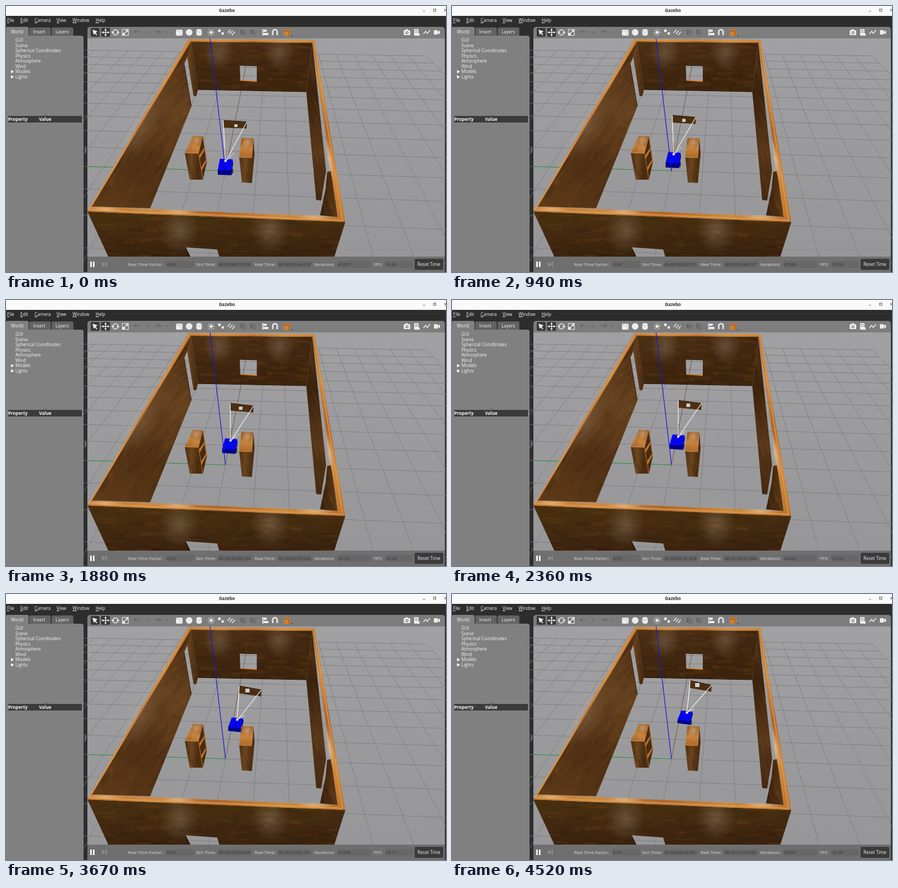
These frames come from a looping animation (800 px wide and 484 px high, 4.55 s). An HTML page with a canvas:

```html
<!DOCTYPE html>
<html lang="en">
<head>
<meta charset="utf-8">
<title>Gazebo</title>
<style>
html, body { margin: 0; width: 100%; height: 100%; overflow: hidden; background: #2d2d2d; }
#stage { position: relative; width: 800px; height: 484px; overflow: hidden; }
canvas { position: absolute; left: 0; top: 0; }
span {
  position: absolute; white-space: pre; line-height: 12px; color: #f4f4f4;
  font: 8.1px/12px "Open Sans", "Noto Sans", sans-serif;
}
span.bold { font-weight: 700; }
span.dark { color: #333; }
span.soft { color: #dedede; }
span.menu { display: block; }
span.menu::first-letter { text-decoration: underline; }
</style>
</head>
<body>
<div id="stage"><canvas id="view" width="800" height="484"></canvas></div>
<script>
const start = performance.now();
const LOOP = 4550, STEP = 30.335, LAST = 4520;
const stage = document.getElementById('stage');
const screen = document.getElementById('view').getContext('2d');
const layer = () => {
  const c = document.createElement('canvas');
  c.width = 800; c.height = 484;
  return c.getContext('2d');
};
let g = screen;

let seed = 7;
const rand = () => (seed = (seed * 16807) % 2147483647) / 2147483647;
const mix = (a, b, u) => a + (b - a) * u;
const between = (p, q, u) => [mix(p[0], q[0], u), mix(p[1], q[1], u)];

// ---------- drawing helpers: a shape is a list of [x, y] points ----------
function trace(points) {
  points.forEach(([x, y], i) => g[i ? 'lineTo' : 'moveTo'](x, y));
}
function poly(points, fill, hole) {
  g.beginPath();
  trace(points);
  g.closePath();
  if (hole) { trace(hole); g.closePath(); }
  g.fillStyle = fill;
  g.fill('evenodd');
}
function line(points, color, width = 1) {
  g.beginPath();
  trace(points);
  g.strokeStyle = color;
  g.lineWidth = width;
  g.stroke();
}
function arc(x, y, r, from, to, color, w = 1.5) {
  g.beginPath();
  g.arc(x, y, r, from, to);
  g.strokeStyle = color;
  g.lineWidth = w;
  g.stroke();
}
function box(x, y, w, h, fill, r = 0) {
  g.beginPath();
  g.roundRect(x, y, w, h, r);
  g.fillStyle = fill;
  g.fill();
}
function dot(x, y, r, fill) {
  g.beginPath();
  g.arc(x, y, r, 0, 7);
  g.fillStyle = fill;
  g.fill();
}
// Triangle of radius r pointing along angle a
function arrow(x, y, r, a, fill) {
  poly([0, 2.1, -2.1].map(d => [x + r * Math.cos(a + d), y + r * Math.sin(a + d)]), fill);
}
function ramp([x0, y0], [x1, y1], ...colors) {
  const s = g.createLinearGradient(x0, y0, x1, y1);
  colors.forEach((c, i) => s.addColorStop(i / (colors.length - 1), c));
  return s;
}
function glow(x, y, rx, ry, alpha, tilt = 0, tone = '205,185,165') {
  g.save();
  g.translate(x, y);
  g.rotate(tilt);
  g.scale(rx, ry);
  const s = g.createRadialGradient(0, 0, 0, 0, 0, 1);
  s.addColorStop(0, `rgba(${tone},${alpha})`);
  s.addColorStop(1, `rgba(${tone},0)`);
  g.fillStyle = s;
  g.fillRect(-1, -1, 2, 2);
  g.restore();
}
// Wooden face: base colour plus random plank stains along a slope
function wood(points, fill, slope, hole) {
  poly(points, fill, hole);
  g.save();
  g.clip('evenodd');
  const xs = points.map(p => p[0]), ys = points.map(p => p[1]);
  const x0 = Math.min(...xs), y0 = Math.min(...ys);
  const w = Math.max(...xs) - x0, h = Math.max(...ys) - y0;
  const run = 1 / Math.hypot(1, slope);
  for (let n = w * h / 160; n > 0; n--) {
    const x = x0 + rand() * w, y = y0 + rand() * h, l = (10 + rand() * 26) * run;
    const tone = rand() < .5 ? '20,8,0' : '165,105,50';
    line([[x, y], [x + l, y + l * slope]], `rgba(${tone},${.03 + rand() * .06})`, 2 + rand() * 5);
  }
  g.restore();
}

// ---------- room ----------
const ORIGIN = [399, 300], SKY = [371, 59];

// Floor position in metres to the screen, through two vanishing points
function ground(X, Y) {
  const a = .078 * X, b = .0039 * Y, w = 1 + a + b;
  return [(399 + a * 494 - b * 14000) / w, (300 - a * 190 - b * 161) / w];
}

// Corners in the order far left, far right, near right, near left
const OUTER = [[332, 60], [561, 62], [617, 393], [148, 374]];
const INNER = [[336, 65], [557, 67], [603, 384], [156, 365]];
const FAR_FOOT = [[349, 152], [546, 156]];

function paintGround() {
  box(148, 59, 650, 397, ramp([0, 59], [0, 456], '#a1a1a3', '#9b9b9d', '#979799'));
  for (let i = -10; i <= 10; i++) {
    line([ground(-10, i), ground(10, i)], '#7a7a7c', .8);
    line([ground(i, -10), ground(i, 10)], '#7a7a7c', .8);
  }
  line([[147, 292], ORIGIN], '#2f9a35');
  line([ORIGIN, [428, 152], [443, 75]], 'rgba(110,62,45,.55)');
}

function paintWalls() {
  const [nw, ne, se, sw] = INNER, [fl, fr] = FAR_FOOT;

  const pane = [[425, 108], [456, 109], [456, 137], [426, 135]];
  wood([nw, ne, fr, fl], ramp(nw, fl, '#4d3116', '#452a11', '#3d240d'), .02, pane);
  for (const x of [387, 497]) glow(x, 85, 28, 32, .24);
  line([pane[3], pane[2]], '#cf853c', 2);
  line([pane[0], pane[1]], '#2b1708');
  line([fl, fr], '#241408', 1.2);

  // left wall with its doorway
  wood([nw, fl, [346, 164], [341, 164], [328, 84]], ramp([330, 0], [350, 0], '#6a431d', '#40260e'), -1.2);
  wood([nw, [329, 94], [324, 106], [337, 183], [262, 368], sw],
    ramp(sw, nw, '#5d3a18', '#4f3014', '#65421f', '#4a2c11'), -1.4);
  glow(243, 222, 30, 72, .2, .5);
  line([[324, 106], [337, 183]], '#2b1808');

  // right wall with its doorway
  wood([ne, [582, 300], [573, 354], [564, 353], fr],
    ramp(ne, [573, 354], '#4c2e13', '#3c230d', '#58371a', '#452910'), 3);
  wood([[584, 302], [592, 300], se, [571, 381], [581, 333]], ramp([575, 0], [602, 0], '#3a210b', '#5b3a1a'), 3);

  // front wall, outer face
  const [, , right, left] = OUTER, frontPane = [[326, 439], [384, 443], [388, 457], [335, 457]];
  wood([left, right, [597, 456], [186, 456]],
    ramp([0, 378], [0, 456], '#49300f', '#432910', '#38210d'), .04, frontPane);
  for (const x of [315, 480]) glow(x, 408, 36, 44, .25);
  line([frontPane[0], frontPane[3]], '#211206', 1.5);

  // wall tops
  OUTER.forEach((a, i) => {
    const j = (i + 1) % 4, b = OUTER[j];
    poly([a, b, INNER[j], INNER[i]], ramp(a, b, '#b9702a', '#cf8a3c', '#b0662a', '#d08a40', '#bd742c'));
    line([between(a, INNER[i], .35), between(b, INNER[j], .35)], '#dc9a50', 1.6);
  });
  glow(589, 280, 5, 38, .6, -.16, '255,225,180');
  for (const x of [180, 313, 560]) glow(x, 368 + (x - 150) * .04, 36, 5, .55, .04, '255,225,180');
}

function paintCase(top, drop, glint) {
  const [a, b, c, d] = top, [cf, df] = drop;
  wood([d, c, cf, df], ramp(d, c, '#4d2e0f', '#6a4520', '#4b2d10'), 4);
  wood(top, ramp(a, d, '#a5672b', '#c68540', '#ad6727'), -3);
  glow(...glint, 10, 10, .5);
  line([d, c], '#d29148');
}

function paintLeftCase() {
  const top = [[340, 236], [358, 237], [350, 268], [325, 267]], foot = [358, 316], back = [365, 285];
  poly([top[1], back, foot, top[2]], '#4a2b0f');
  for (const u of [.1, .55]) {
    const near = between(top[2], foot, u), far = between(top[1], back, u + .25);
    poly([near, [far[0], far[1] + 4], [far[0], far[1] + 9], [near[0] + 1, near[1] + 6]], '#bd7633');
  }
  line([top[1], back], '#a5682d', 1.4);
  paintCase(top, [foot, [334, 316]], [347, 243]);
  line([top[2], foot], '#99602a', 1.4);
}

function paintRightCase() {
  const top = [[428, 240], [450, 241], [447, 276], [424, 275]];
  poly([top[1], [452, 270], [447, 322], top[2]], '#4f3013');
  paintCase(top, [[447, 322], [429, 321]], [439, 248]);
}

// ---------- window chrome ----------
const FIELDS = [['Real Time Factor:', 222, 291, 51], ['Sim Time:', 345.5, 385, 62],
  ['Real Time:', 452, 494, 62], ['Iterations:', 560.5, 602, 62], ['FPS:', 669, 689, 51]];

function paintChrome() {
  box(0, 0, 800, 18, '#fafafa');
  line([[758, 9.5], [762, 9.5]], '#777');
  g.strokeStyle = '#555';
  g.strokeRect(777.5, 5.5, 4, 4);
  line([[797, 5], [801, 9.5]], '#444');
  line([[797, 10], [801, 5.5]], '#444');

  box(0, 38, 41, 18, '#808080', [3, 3, 0, 0]);
  for (const x of [42, 83]) box(x, 39, 39.5, 15, '#626262', [3, 3, 0, 0]);
  box(0, 54, 141, 430, '#808080', [0, 4, 0, 0]);
  box(4, 200, 134, 12, '#3b3b3b');
  box(68, 198, 9, 1, '#666');
  box(143.5, 258, 2, 9, '#777');
  for (const y of [119.5, 129]) arrow(11, y, 3.6, 0, '#fff');

  box(148, 38, 650, 21, '#7d7d7d', [5, 5, 0, 0]);
  box(148, 456, 650, 28, '#6f6f6f');
  box(743, 460, 52, 20, '#3a3a3a', 2);
  for (const x of [153, 158]) box(x, 465, 3, 10, '#f2f2f2');
  arrow(177, 470, 4.6, 0, '#8f8f8f');
  box(181.5, 465, 2, 10, '#8f8f8f');
  FIELDS.forEach(([, , x, w]) => box(x, 464, w, 12, '#676767', 2));
}

function paintTools() {
  const W = '#ececec', D = '#686868', Q = Math.PI / 2;
  for (const x of [227, 302, 362, 420, 461, 500]) box(x, 41, 1, 14, '#747474');
  for (const x of [154, 173]) box(x, 40, 16, 16, '#383838', 2);

  // pointer, move, rotate, scale
  arrow(161, 47, 5.5, -2.3, W);
  line([[161, 47], [165, 53]], W, 2);
  for (let i = 0; i < 4; i++) {
    const c = Math.cos(i * Q), s = Math.sin(i * Q);
    line([[181, 48], [181 + c * 5, 48 + s * 5]], W, 1.4);
    arrow(181 + c * 5, 48 + s * 5, 2.6, i * Q, W);
  }
  for (const turn of [0, Math.PI]) {
    arc(199, 48, 4.7, turn + .4, turn + 2.9, W);
    arrow(199 + 4.7 * Math.cos(turn), 48 + 4 * Math.sin(turn), 3, turn - Q, W);
  }
  g.strokeStyle = W;
  g.lineWidth = 1;
  g.strokeRect(211.5, 42.5, 11, 11);
  line([[214, 51], [221, 44]], W, 1.4);
  arrow(220, 45, 3, -Q / 2, W);
  box(212, 49, 4, 4, W);

  // undo, redo
  for (const [x, dir] of [[239, -1], [275, 1]]) {
    arc(x, 51, 5, -Q - .8, -Q + .8, D, 2);
    arrow(x + dir * 4, 47, 4, dir < 0 ? Math.PI : 0, D);
    arrow(x + 17.5, 48, 2.6, Q, D);
  }

  // cube, sphere, cylinder, lights
  box(309, 43, 12, 11, W, 2);
  line([[309, 45.5], [318, 45.5], [318, 54]], '#c8c8c8');
  dot(333, 48, 6, W);
  box(346, 42, 10, 12, W, 4);
  arc(351, 44.5, 3.6, 0, Math.PI, '#bbb', .8);
  dot(373, 48, 2.8, W);
  for (let i = 0; i < 8; i++) {
    const c = Math.cos(i * Q / 2), s = Math.sin(i * Q / 2);
    line([[373 + c * 4, 48 + s * 4], [373 + c * 6.3, 48 + s * 6.3]], W, 1.1);
  }
  dot(388, 45, 2.6, W);
  dot(394, 50, 2.4, W);
  for (const d of [0, 4, 8]) line([[403 + d, 49 + d / 2], [408 + d, 43 + d / 2]], W, 1.4);

  // copy, paste, align, snap, view
  for (const x of [426, 444]) { box(x, 43, 7, 9, D); box(x + 4, 45, 7, 9, '#717171'); }
  box(466, 42, 1.6, 12, W); box(468, 43, 6, 4, W); box(468, 49, 9, 4, W);
  arc(489, 47, 4, Math.PI, 0, W, 2.6);
  for (const x of [483.7, 491.7]) box(x, 47, 2.6, 6, W);
  box(505, 43, 12, 11, '#d27f2b', 1);
  line([[505, 45.5], [514.5, 45.5], [514.5, 54]], '#7c4c1c');
  arrow(519.5, 54, 1.8, Q, '#444');

  // screenshot, log, plot, video
  box(723, 44, 12, 9, W, 1.5); box(726, 42.5, 5, 3, W);
  dot(729, 48.5, 2.6, '#6d6d6d'); dot(729, 48.5, 1.4, W);
  box(742, 42, 8, 12, W, 1);
  for (const y of [44, 47]) box(743.5, y, 5, 1, '#777');
  dot(750, 52, 2.4, W);
  line([[759, 51], [763, 46], [766, 50], [771, 44]], W, 1.6);
  box(778, 44, 7, 8, W, 1);
  arrow(787, 48, 4, Math.PI, W);
}

// ---------- text ----------
function put(text, x, y, cls = '', size = 8.1) {
  const el = document.createElement('span');
  el.textContent = text;
  el.className = cls;
  el.style.cssText = `left:${x}px;top:${y - 6}px;font-size:${size}px`;
  stage.append(el);
  return el;
}
put('Gazebo', 387, 7.5, 'bold dark', 8);
Object.entries({ File: 2, Edit: 26, Camera: 52, View: 92, Window: 121, Help: 163 })
  .forEach(([name, x]) => put(name, x, 25.5, 'menu'));
['World', 'Insert', 'Layers'].forEach((name, i) => put(name, 9 + i * 40.5, 46.5));
['GUI', 'Scene', 'Spherical Coordinates', 'Physics', 'Atmosphere', 'Wind', 'Models', 'Lights']
  .forEach((name, i) => put(name, 17, 62 + i * 9.57));
put('Property', 4, 206, 'bold');
put('Value', 60, 206, 'bold');
put('Reset Time', 748, 470);
const [factorOut, simOut, realOut, iterOut, fpsOut] = FIELDS.map(([name, x, fieldX]) => {
  put(name, x, 470, 'soft', 7.9);
  return put('', fieldX + 1.5, 470, 'dark', 7.9);
});
factorOut.textContent = '0.99';

const clock = ms => {
  const pad = (n, size) => String(Math.floor(n)).padStart(size, '0');
  return `00 00:${pad(ms / 60000, 2)}:${pad(ms / 1000 % 60, 2)}.${pad(ms % 1000, 3)}`;
};

// ---------- motion ----------
// Simulated ms: the recording opens slowly, then runs at an even rate
const simulated = t => 3.81 * Math.min(t, 520) + 5.076 * Math.max(t - 520, 0);
const END = simulated(LAST);

const axis = () => line([SKY, ORIGIN], '#1414e0', 1.2);

// u runs from 0 to 1 along the drive, which bends slightly to the right
function robot(u) {
  const x = 399 + 20 * u + 8 * u * u, y = 282 - 66 * u;
  const at = (dx, dy) => [x + dx, y + dy];
  const top = [at(-10, -4), at(mix(13, 10, u), mix(-3, -2, u)),
    at(mix(11, 6, u), mix(17, 16, u)), at(mix(-14, -17, u), mix(16, 13, u))];
  const [, tr, br, bl] = top, h = mix(9, 6, u);
  const drop = ([px, py]) => [px, py + h];

  const a = [395 + 28 * u + 10 * u * u, 208 - 50.5 * u];
  const b = [a[0] + 43 - 4 * u * u, a[1] + 2.7 + 5.5 * u];
  const size = mix(5.7, 8, u), spot = [a[0] + 23 - 10 * u, a[1] + 10 - 1.5 * u];
  const past = bl[1] + h < ORIGIN[1];
  if (!past) axis();

  // camera image
  poly([a, b, [b[0] - .5, b[1] + 12], [a[0], a[1] + 13.5]], '#4b2e14');
  line([a, b], '#2f1a08');
  box(spot[0] - size / 2, spot[1] - size / 2, size, size * .9, '#d6d0c8');

  // body, wheel and mast
  box(br[0] - 1, br[1] - 3, 4, 9, '#3a3a3c', 1);
  poly([tr, br, drop(br), [tr[0] + 1, tr[1] + h - 2]], '#000070');
  poly([bl, br, drop(br), drop(bl)], '#000086');
  poly(top, '#0505ee');
  line([bl, br], '#0000b8');
  const raised = u < .58;
  line([at(0, -3), at(mix(-1.5, 3, u), raised ? -23 : -10)], raised ? '#7a4a22' : '#c98038', 2.2);
  box(x - 2, y - 2, 4, 4, '#d8c9a0');

  // view lines
  line([at(0, 0), a], '#f4f4f0', 1.2);
  line([at(0, 0), [a[0], a[1] + 13]], 'rgba(240,240,235,.5)', .8);
  line([at(1, 0), b], '#f4f4f0', 1.2);
  line([at(2, -1), at(mix(16, 14, u), mix(-15, -7, u))], '#e6e6e2');
  if (past) axis();
}

// ---------- assemble ----------
const back = g = layer();
box(0, 0, 800, 484, '#2d2d2d');
paintGround();
paintWalls();
paintLeftCase();
paintChrome();
paintTools();
const front = g = layer();
paintRightCase();
g = screen;

function frame() {
  const now = (performance.now() - start) % LOOP;
  const t = Math.min(LAST, Math.floor(now / STEP + .05) * STEP);
  const ms = Math.round(simulated(t)), u = ms / END;
  screen.drawImage(back.canvas, 0, 0);
  screen.save();
  screen.beginPath();
  screen.rect(148, 59, 650, 397);
  screen.clip();
  robot(u);
  screen.restore();
  screen.drawImage(front.canvas, 0, 0);
  simOut.textContent = clock(501656 + ms);
  realOut.textContent = clock(Math.round(44070 + ms * 1.00768));
  iterOut.textContent = 43235 + ms;
  fpsOut.textContent = (16.55 - .25 * u + .28 * Math.cos(11 * u)).toFixed(2);
  requestAnimationFrame(frame);
}
frame();
</script>
</body>
</html>
```
